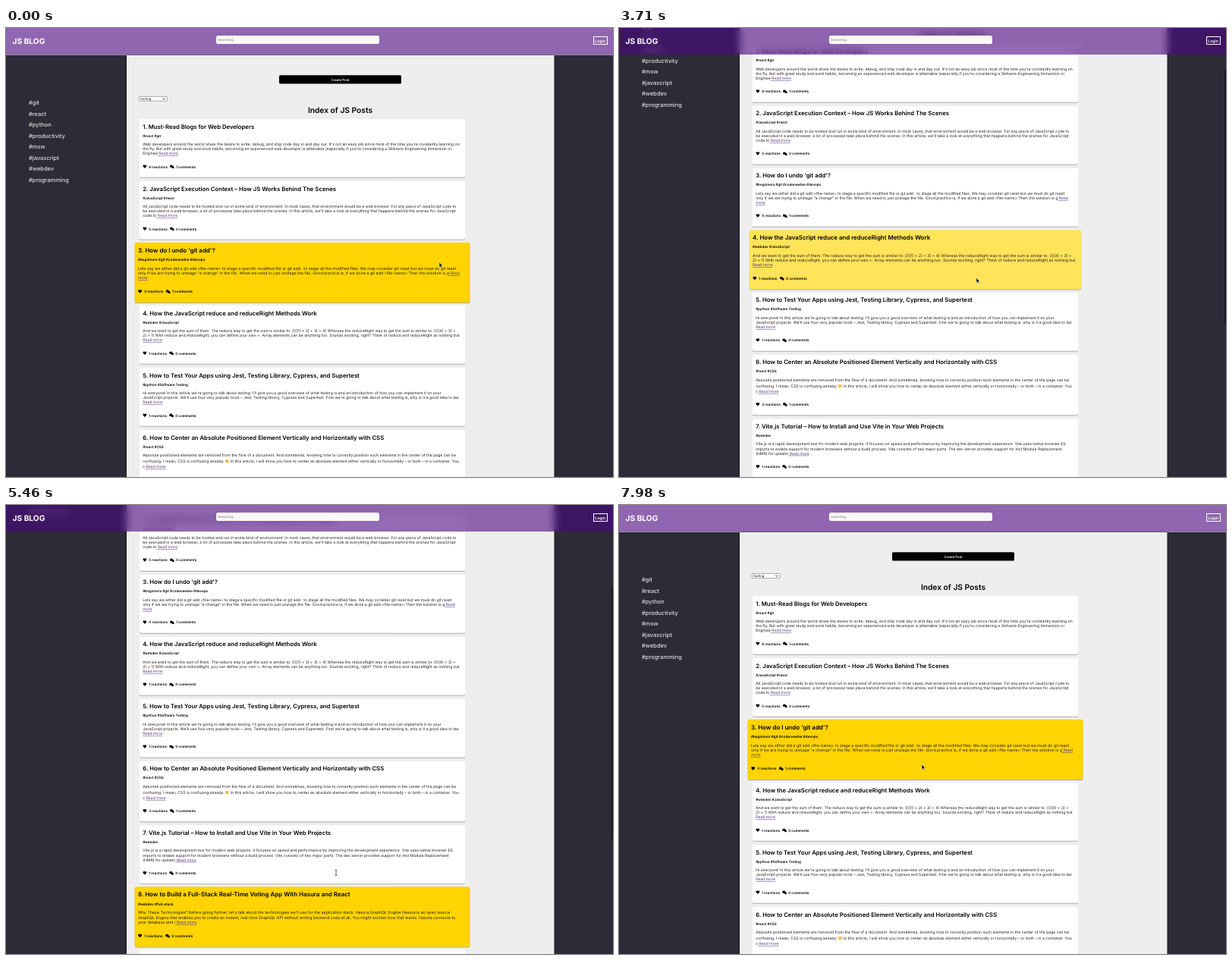
An HTML page that plays this animation: 800x592 px, repeating every 8 s.

```html
<!DOCTYPE html>
<html lang="en">
<head>
<meta charset="utf-8">
<title>JS Blog</title>
<style>
  html, body { margin: 0; width: 100%; height: 100%; overflow: hidden; background: #f5f5f5; }
  svg { position: absolute; left: 0; top: 0; width: 800px; height: 592px; }
  text { font-family: Inter, sans-serif; text-rendering: geometricPrecision; white-space: pre; }
  header {
    position: absolute; left: 0; top: 0; width: 800px; height: 35px;
    background: rgba(75, 8, 128, .6); backdrop-filter: blur(5.5px);
  }
  .main { fill: #eee; filter: drop-shadow(0 0 1.2px #000); }
  .card { filter: drop-shadow(0 1px .6px rgba(0, 0, 0, .28)); }
  .link { fill: #553a80; text-decoration: underline; }
</style>
</head>
<body>
<svg id="page" viewBox="0 0 800 592"></svg>
<header></header>
<svg id="overlay" viewBox="0 0 800 592"></svg>
<script>
const LOOP = 8000;
const CARD_HEIGHT = 76.8, CARD_STEP = 82, FIRST_CARD = 120, CARD_CENTER = 390.5;
const TALL_EXTRA = 2.6;

const topics = ['git', 'react', 'python', 'productivity', 'msw', 'javascript', 'webdev', 'programming'];

// A "|" in a line starts the link.
const posts = [
  { title: 'Must-Read Blogs for Web Developers', tags: '#react #git', reactions: 6, comments: 1, lines: [
    "Web developers around the world share the desire to write, debug, and ship code day in and day out. It's not an easy job since most of the time you're constantly learning on",
    "the fly. But with great study and work habits, becoming an experienced web developer is attainable (especially if you're considering a Skilvane Engineering Immersion or",
    'Enginee| Read more'] },
  { title: 'JavaScript Execution Context – How JS Works Behind The Scenes', tags: '#JavaScript #react', reactions: 5, comments: 0, lines: [
    'All JavaScript code needs to be hosted and run in some kind of environment. In most cases, that environment would be a web browser. For any piece of JavaScript code to',
    "be executed in a web browser, a lot of processes take place behind the scenes. In this article, we'll take a look at everything that happens behind the scenes for JavaScript",
    'code to| Read more'] },
  { title: "How do I undo 'git add'?", tags: '#beginners #git #codenewbie #devops', reactions: 0, comments: 1, lines: [
    'Lets say we either did a git add <file-name> to stage a specific modified file or git add . to stage all the modified files. We may consider git reset but we must do git reset',
    'only if we are trying to unstage "a change" in the file. When we need to just unstage the file. Good practice is, if we done a git add <file-name> Then the solution is g| Read',
    '|more'] },
  { title: 'How the JavaScript reduce and reduceRight Methods Work', tags: '#webdev #JavaScript', reactions: 1, comments: 0, lines: [
    'And we want to get the sum of them. The reduce way to get the sum is similar to: ((((1) + 2) + 3) + 4) Whereas the reduceRight way to get the sum is similar to: ((((4) + 3) +',
    '2) + 1) With reduce and reduceRight, you can define your own +. Array elements can be anything too. Sounds exciting, right? Think of reduce and reduceRight as nothing but',
    '|Read more'] },
  { title: 'How to Test Your Apps using Jest, Testing Library, Cypress, and Supertest', tags: '#python #Software Testing', reactions: 1, comments: 0, lines: [
    "Hi everyone! In this article we're going to talk about testing. I'll give you a good overview of what testing is and an introduction of how you can implement it on your",
    "JavaScript projects. We'll use four very popular tools – Jest, Testing library, Cypress and Supertest. First we're going to talk about what testing is, why is it a good idea to tes",
    '|Read more'] },
  { title: 'How to Center an Absolute Positioned Element Vertically and Horizontally with CSS', tags: '#react #CSS', reactions: 3, comments: 1, tall: true, lines: [
    'Absolute positioned elements are removed from the flow of a document. And sometimes, knowing how to correctly position such elements in the center of the page can be',
    'confusing. I mean, CSS is confusing already. \u2003 In this article, I will show you how to center an absolute element either vertically or horizontally – or both – in a container. You',
    'c| Read more'] },
  { title: 'Vite.js Tutorial – How to Install and Use Vite in Your Web Projects', tags: '#webdev', reactions: 1, comments: 0, lines: [
    'Vite.js is a rapid development tool for modern web projects. It focuses on speed and performance by improving the development experience. Vite uses native browser ES',
    'imports to enable support for modern browsers without a build process. Vite consists of two major parts: The dev server provides support for Hot Module Replacement',
    '(HMR) for updatin| Read more'] },
  { title: 'How to Build a Full-Stack Real-Time Voting App With Hasura and React', tags: '#webdev #full-stack', reactions: 1, comments: 0, lines: [
    "Why These Technologies? Before going further, let's talk about the technologies we'll use for the application stack. Hasura GraphQL Engine Hasura is an open source",
    'GraphQL Engine that enables you to create an instant, real-time GraphQL API without writing backend code at all. You might wonder how that works. Hasura connects to',
    'your database and i| Read more'] },
  { title: 'How to Create Reusable SVG Icon React Components', tags: '#git #react', reactions: 1, comments: 0, lines: [
    "We use icons when building frontend applications all the time – for indications, pointers, and so on. Here's how to create a reusable React component for icons. When it",
    "comes to icons, you can use PNG or SVG images. PNGs come with a fixed color but allow dimension changes (like a regular image). In some cases this alters the image's",
    'quality. SVGs| Read more'] },
];

const escapeText = s => s.replace(/&/g, '&amp;').replace(/</g, '&lt;');
const text = (x, y, size, content, { weight = 400, fill = '#000', anchor = 'start' } = {}) => {
  const [plain, link] = content.split('|').map(escapeText);
  const tail = link ? `<tspan class="link">${link}</tspan>` : '';
  return `<text x="${x}" y="${y}" font-size="${size}" font-weight="${weight}" fill="${fill}" text-anchor="${anchor}">${plain}${tail}</text>`;
};
const rect = (x, y, w, h, attrs) => `<rect x="${x}" y="${y}" width="${w}" height="${h}" ${attrs}/>`;

const bold = { weight: 600 };
const heart = y => `<path transform="translate(180.4 ${y})" d="M2.5 4.7 .4 2.5A1.3 1.3 0 0 1 2.5 .8 1.3 1.3 0 0 1 4.6 2.5Z"/>`;
const bubbles = (x, y) => `<g transform="translate(${x} ${y})">
  <path d="M.2 3.6 .5 2.4H2Z"/><ellipse cx="2" cy="1.7" rx="2" ry="1.6"/>
  <path d="M5.6 4.9 5 3.6 3.6 4.3Z"/><ellipse cx="3.9" cy="3.1" rx="1.7" ry="1.4"/></g>`;

function cardMarkup(post, index) {
  const extra = post.tall ? TALL_EXTRA : 0;
  const baselines = post.tall ? [35.4, 43, 50] : [35, 41.1, 47.2];
  const shift = post.reactions === 1 ? -.7 : 0;
  const statsY = 64.6 + extra;
  return `<g class="post">
    ${rect(176, 0, 429, CARD_HEIGHT + extra, 'rx="2" class="card"')}
    ${text(180.2, 12.5, 7.73, `${index + 1}. ${post.title}`, bold)}
    ${text(180.2, 23.6, 4.55, post.tags, bold)}
    ${post.lines.map((line, i) => text(180.2, baselines[i], 5.12, line, { fill: '#222' })).join('')}
    ${post.tall ? '<circle cx="291.3" cy="41.2" r="2.4" fill="#f2bd3c"/>' : ''}
    ${heart(statsY - 4.4)}
    ${text(188.3, statsY, 4.55, `${post.reactions} reactions`, bold)}
    ${bubbles(216 + shift, statsY - 4.1)}
    ${text(223.9 + shift, statsY, 4.55, `${post.comments} comments`, bold)}
  </g>`;
}

document.getElementById('page').innerHTML = `<g id="scroller">
  ${rect(0, 35.5, 800, 1200, 'fill="#2c2b37"')}
  ${rect(159, 36, 563.5, 1200, 'class="main"')}
  ${topics.map((topic, i) => text(30, 101.2 + i * 14.5, 7.5, '#' + topic, { weight: 500, fill: '#ddd' })).join('')}
  ${rect(360, 62.3, 161, 11.2, 'rx="1.5"')}
  ${text(440.5, 69.6, 4.27, 'Create Post', { weight: 600, fill: '#fff', anchor: 'middle' })}
  ${rect(175.3, 90.4, 37, 6, 'rx=".6" fill="#fff" stroke="#777" stroke-width=".6"')}
  ${text(177, 94.9, 4.2, 'Sorting')}
  <path d="M206.3 92.6 208 94.3 209.7 92.6" fill="none" stroke="#000" stroke-width=".8"/>
  ${text(440.5, 112.3, 10.24, 'Index of JS Posts', { weight: 600, anchor: 'middle' })}
  ${posts.map(cardMarkup).join('')}
</g>`;

document.getElementById('overlay').innerHTML = `
  ${text(8.6, 20.7, 10.2, 'JS BLOG', { weight: 700, fill: '#fff' })}
  ${rect(277, 10, 215, 11, 'rx="2.5" fill="#f8f8f8"')}
  ${text(279, 17.2, 4.2, 'Searching...', { fill: '#777' })}
  ${rect(774.5, 11.5, 18, 10, 'fill="none" stroke="#fff"')}
  ${text(783.2, 18.5, 5.2, 'Login', { weight: 600, fill: '#fff', anchor: 'middle' })}
  ${rect(798, 0, 2, 335, 'id="scrollbar" rx="1" fill="rgba(0,0,0,.45)"')}
  <g id="cursor">
    <path id="arrow" d="M0 0V6.6L1.5 5.2 2.4 7.4 3.5 6.9 2.6 4.8H4.6Z" stroke="#fff" stroke-width=".5"/>
    <path id="beam" d="M-1.3-3.6H1.3M0-3.6V3.6M-1.3 3.6H1.3" fill="none" stroke="#333" stroke-width=".8"/>
  </g>`;

const [scroller, scrollbar, cursor, arrow, beam] =
  ['scroller', 'scrollbar', 'cursor', 'arrow', 'beam'].map(id => document.getElementById(id));
const cards = [...document.querySelectorAll('.post')].map((group, i) => ({
  group,
  panel: group.querySelector('.card'),
  top: FIRST_CARD + i * CARD_STEP + (i > 5 ? TALL_EXTRA : 0),
  middle: (CARD_HEIGHT + (posts[i].tall ? TALL_EXTRA : 0)) / 2,
}));

// [time, x, y]
const cursorKeys = [
  [0, 571, 309], [1500, 508, 178], [2400, 508, 178], [3250, 471, 329.5], [3800, 471, 329.5],
  [4500, 434, 475], [4900, 434, 475], [5300, 435, 485], [5700, 435, 485],
  [6150, 425, 449], [6500, 425, 449], [7950, 399, 342], [LOOP, 399, 342],
];
// [time, post under the pointer], -1 for none
const hoverKeys = [
  [-500, 2], [450, 1], [1090, 0], [2605, 1], [2935, 2], [3530, 3], [3800, -1],
  [4650, 7], [5550, -1], [5800, 4], [6650, 3], [7520, 2],
];

const clamp = u => Math.min(1, Math.max(0, u));
const smooth = u => { u = clamp(u); return u * u * (3 - 2 * u); };
const easeOut = u => 1 - (1 - clamp(u)) ** 3;

const scrollAt = t => 251.8 * (easeOut((t - 3500) / 1374) - easeOut((t - 5392) / 800));

function cursorAt(t) {
  const next = cursorKeys.findIndex(key => key[0] > t);
  const [t0, x0, y0] = cursorKeys[next - 1], [t1, x1, y1] = cursorKeys[next];
  const u = smooth((t - t0) / (t1 - t0));
  return [x0 + (x1 - x0) * u, y0 + (y1 - y0) * u];
}

function render(t) {
  const scroll = scrollAt(t);
  scroller.setAttribute('transform', `translate(0 ${-scroll})`);
  scrollbar.setAttribute('y', scroll * .555);
  scrollbar.style.display = t > 3500 && t < 6600 ? '' : 'none';

  const [since, hovered] = hoverKeys.findLast(key => key[0] <= t);
  cards.forEach(({ group, panel, top, middle }, i) => {
    const p = i === hovered ? smooth((t - since) / 300) : 0;
    group.setAttribute('transform',
      `translate(${CARD_CENTER} ${top + middle}) scale(${1 + .03 * p}) translate(${-CARD_CENTER} ${-middle})`);
    panel.setAttribute('fill', `rgb(255,${255 - 43 * p},${255 - 255 * p})`);
  });

  cursor.setAttribute('transform', `translate(${cursorAt(t).join(' ')})`);
  const overText = t > 4900 && t < 5750;
  arrow.style.display = overText ? 'none' : '';
  beam.style.display = overText ? '' : 'none';
}

const start = performance.now();
function tick() {
  render((performance.now() - start) % LOOP);
  requestAnimationFrame(tick);
}
tick();
</script>
</body>
</html>
```
